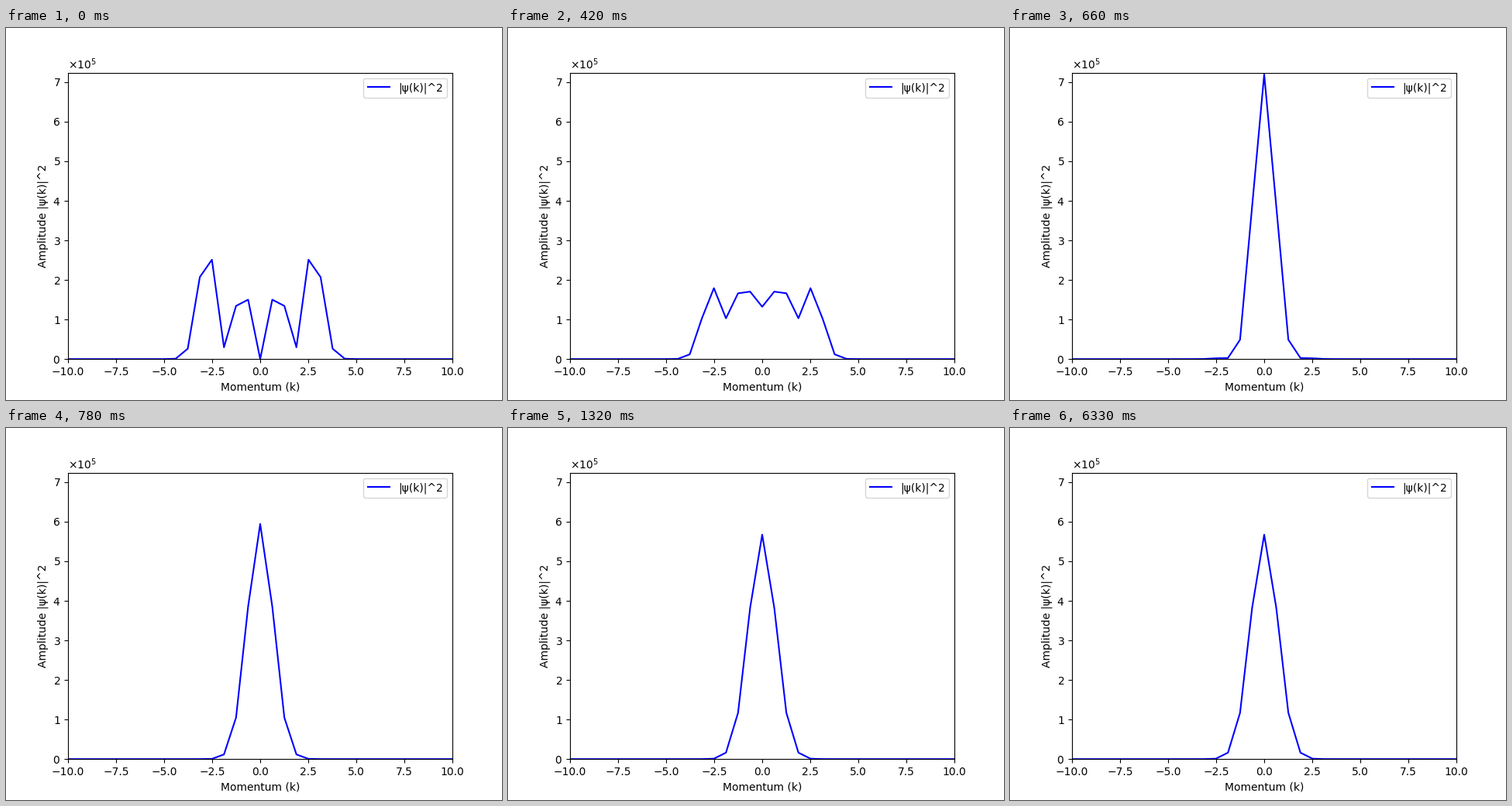
Recreate the animation shown at these times as a matplotlib script. Size 640 px wide and 480 px high, loop 6.45 s.

```python
import math

import matplotlib.pyplot as plt
import numpy as np
from matplotlib.animation import FuncAnimation
from numpy.polynomial.hermite import hermval

INTERVAL = 30
FRAMES = 215
TICKS_PER_STEP = 2
LAST_STEP = 22

BOX = 10
DK = 2 * np.pi / BOX
SCALE = 1.6e6 * DK

# Oscillator levels 0..5 and their weights at the crossover step.
LEVELS = np.arange(6)
WEIGHTS = np.array([1.2, 1.15, 3.2, 4.6, 3.5, 1.0])
CROSSOVER = 9
DECAY = 0.481 * LEVELS + 0.0114 * LEVELS**2

k = DK * np.arange(-17, 18)


def oscillator(n):
    """Real part of the n-th momentum eigenfunction, with its phase sign."""
    norm = math.sqrt(2**n * math.factorial(n) * math.sqrt(math.pi))
    poly = hermval(k, [0] * n + [1])
    return (-1) ** (n // 2) * poly * np.exp(-k**2 / 2) / norm


modes = np.array([oscillator(n) for n in LEVELS])


def density(step):
    """Momentum density after imaginary-time decay towards the ground state."""
    c = WEIGHTS * np.exp(-DECAY * (step - CROSSOVER))
    c /= np.linalg.norm(c)
    even = c[::2] @ modes[::2]
    odd = c[1::2] @ modes[1::2]
    return SCALE * (even**2 + odd**2)


fig, ax = plt.subplots(figsize=(6.4, 4.8), dpi=100)
line, = ax.plot(k, density(0), color="blue", label="|ψ(k)|^2")
ax.set_xlim(-10, 10)
ax.set_ylim(0, 7.24e5)
ax.set_xlabel("Momentum (k)")
ax.set_ylabel("Amplitude |ψ(k)|^2")
ax.ticklabel_format(axis="y", style="sci", scilimits=(0, 0), useMathText=True)
ax.legend(loc="upper right")


def update(frame):
    step = min(frame // TICKS_PER_STEP, LAST_STEP)
    line.set_ydata(density(step))
    return line,


anim = FuncAnimation(fig, update, frames=FRAMES, interval=INTERVAL,
                     repeat=True, repeat_delay=0)
plt.show()
```
